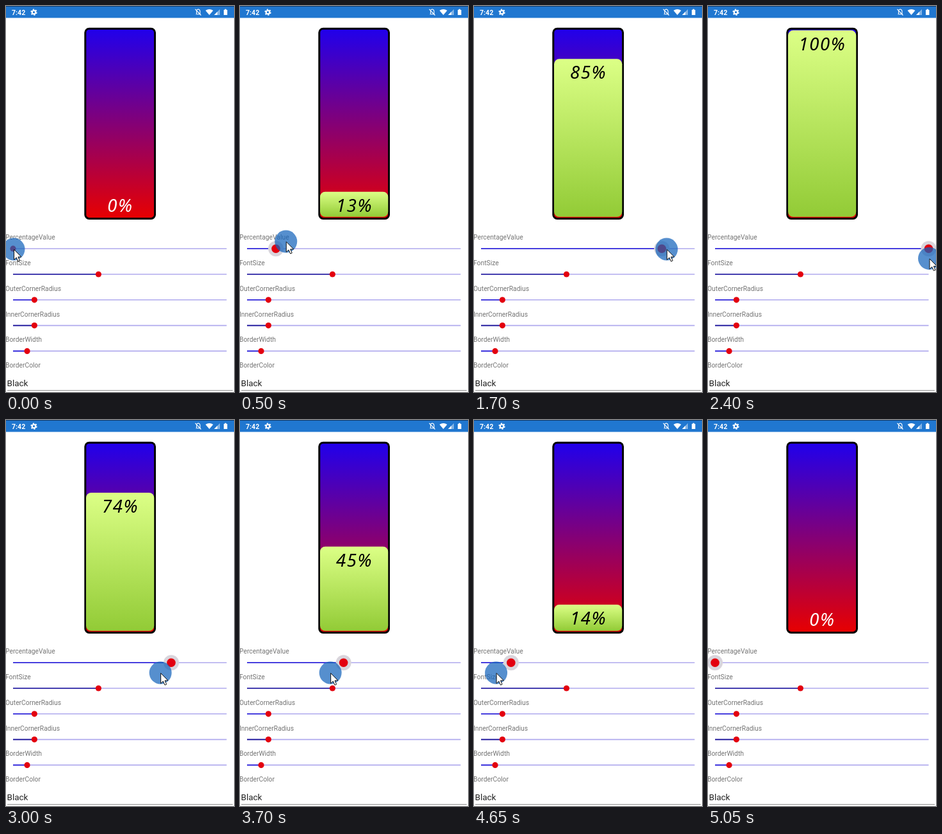
Recreate the animation shown at these times as an HTML page. Size 356 by 600 pixels, loop 5.1 s.

```html
<!DOCTYPE html>
<html lang="en">
<head>
<meta charset="utf-8">
<title>Percentage bar</title>
<style>
  html, body { margin: 0; width: 100%; height: 100%; overflow: hidden; background: #fff; }
  svg { display: block; width: 356px; height: 600px; }
  text { font-family: Roboto, sans-serif; }
  .label { font-size: 10.3px; fill: #757575; }
  #percent {
    font: italic 500 27.5px "Noto Sans", "Open Sans", sans-serif;
    letter-spacing: 1.6px;
    text-anchor: middle;
  }
</style>
</head>
<body>
<svg viewBox="0 0 356 600">
  <defs>
    <linearGradient id="back" x2="0" y2="1">
      <stop stop-color="#2000ec"/><stop offset="1" stop-color="#e80000"/>
    </linearGradient>
    <linearGradient id="lime" x2="0" y2="1">
      <stop stop-color="#dcff86"/><stop offset="1" stop-color="#92cb36"/>
    </linearGradient>
  </defs>
  <rect width="356" height="600" fill="#fff"/>

  <g id="status">
    <rect width="356" height="18.5" fill="#2077d0"/>
    <rect width="356" height="1" fill="#123a66"/>
    <text x="9" y="13.5" font-size="10.6" font-weight="600" fill="#fff">7:42</text>
    <g fill="none" stroke="#fff">
      <circle cx="43.5" cy="9.7" r="2.7" stroke-width="2.2"/>
      <circle cx="43.5" cy="9.7" r="4.3" stroke-width="1.7" stroke-dasharray="2.2 2.3"/>
      <path d="M296.5 12.7h7.5M297.5 12v-3.5q0-3 2.7-3.5q2.8.5 2.8 3.5v3.5M295.5 5l9 9.5" stroke-width="1.1"/>
    </g>
    <path d="M311.5 7q6-4.2 12 0l-6 7z" fill="#fff"/>
    <path d="M334 5v9h-9z" fill="#fff" opacity=".45"/>
    <path d="M330 9v5h-5z" fill="#fff"/>
    <path d="M340 6h1.5v-1.2h2.5v1.2h1.5v8h-5.5z" fill="#fff"/>
  </g>

  <rect x="123.8" y="35.2" width="108.7" height="295.2" rx="6" fill="url(#back)" stroke="#000" stroke-width="3"/>
  <rect id="fill" x="125" width="106.3" fill="url(#lime)"/>
  <text id="percent" x="178.5"></text>

  <g id="sliders"></g>
  <text class="label" x="-1" y="562.3">BorderColor</text>
  <text x="1.5" y="591" font-size="13.5" fill="#222">Black</text>
  <path d="M2 597.5H354" stroke="#8c8c8c"/>

  <g id="pointer">
    <circle r="17.5" fill="#1565bc" opacity=".72"/>
    <path d="M.5.5V16.5l3.7-3.5 2.7 6 2.6-1.1-2.6-5.9h5z" fill="#fff" stroke="#111"/>
  </g>
</svg>
<script>
const LOOP = 5100, STEP = 50;
const RISE_END = 1900, FALL_START = 2550, FALL_END = 4990;
const TRACK_LEFT = 11, TRACK_WIDTH = 333.5, TRACK_Y = 377.2;
const FILL_BOTTOM = 327.8;

const byId = id => document.getElementById(id);
const progress = (time, from, to) => Math.min(1, Math.max(0, (time - from) / (to - from)));
const wave = turns => Math.sin(Math.PI * turns);
const sliderX = percent => TRACK_LEFT + TRACK_WIDTH * percent / 100;

function set(node, attributes) {
  for (const name in attributes) node.setAttribute(name, attributes[name]);
}

function sliderMarkup([name, percent], row) {
  const y = TRACK_Y + row * 39.8, x = sliderX(percent);
  const color = row % 2 ? "#1a1298" : "#1a10d8";
  return `<text class="label" x="-1" y="${y - 14}">${name}</text>
    <path d="M${TRACK_LEFT} ${y}H344.5" stroke="#b0aaee" stroke-width="1.6"/>
    <path class="active" d="M${TRACK_LEFT} ${y}H${x}" stroke="${color}" stroke-width="1.6"/>
    <circle class="halo" cx="${x}" cy="${y}" r="12" fill="#d9d5dc" opacity="0"/>
    <circle class="thumb" cx="${x}" cy="${y}" r="4.6" fill="#e3000f"/>`;
}

byId("sliders").innerHTML = [
  ["PercentageValue", 0], ["FontSize", 40], ["OuterCornerRadius", 10],
  ["InnerCornerRadius", 10], ["BorderWidth", 6.6]
].map(sliderMarkup).join("");

// The first slider is the one being dragged.
const [active, halo, thumb] = ["active", "halo", "thumb"]
  .map(name => document.querySelector("." + name));

// Accelerates up to 100, rests, then falls with a slight sway.
function percentAt(rise, fall) {
  return fall > 0
    ? Math.max(0, 100 * (1 - fall) - 7 * wave(fall) - 4 * wave(2 * fall))
    : 100 * rise ** 1.5;
}

function drawBar(percent) {
  const height = percent * 2.9, top = FILL_BOTTOM - height;
  set(byId("fill"), { y: top, height, rx: Math.min(8, height / 2) });
  set(byId("percent"), {
    y: Math.min(top + 21, 310) + 10,
    fill: percent < 7 ? "#fff" : "#000"
  });
  byId("percent").textContent = Math.round(percent) + "%";
}

function drawSlider(x, dragging) {
  set(active, { d: `M${TRACK_LEFT} ${TRACK_Y}H${x}` });
  set(halo, { cx: x, opacity: dragging ? 1 : 0 });
  set(thumb, { cx: x, r: dragging ? 6.8 : 4.6 });
}

// The pointer runs ahead of the thumb and swings from above the track to below it.
function drawPointer(x, time, rise, fall) {
  const lead = 20 * wave(rise) - 25 * fall ** 0.2;
  const y = 378 - 15 * wave(Math.min(time, FALL_START) / 1700);
  set(byId("pointer"), {
    transform: `translate(${x + lead + 1} ${y})`,
    visibility: fall < 1 ? "visible" : "hidden"
  });
}

function draw(time) {
  const rise = progress(time, 0, RISE_END);
  const fall = progress(time, FALL_START, FALL_END);
  const percent = percentAt(rise, fall), x = sliderX(percent);
  drawBar(percent);
  drawSlider(x, time > 0);
  drawPointer(x, time, rise, fall);
}

const start = performance.now();
function tick() {
  const elapsed = (performance.now() - start) % LOOP;
  draw(Math.floor(elapsed / STEP) * STEP);
  requestAnimationFrame(tick);
}
tick();
</script>
</body>
</html>
```
